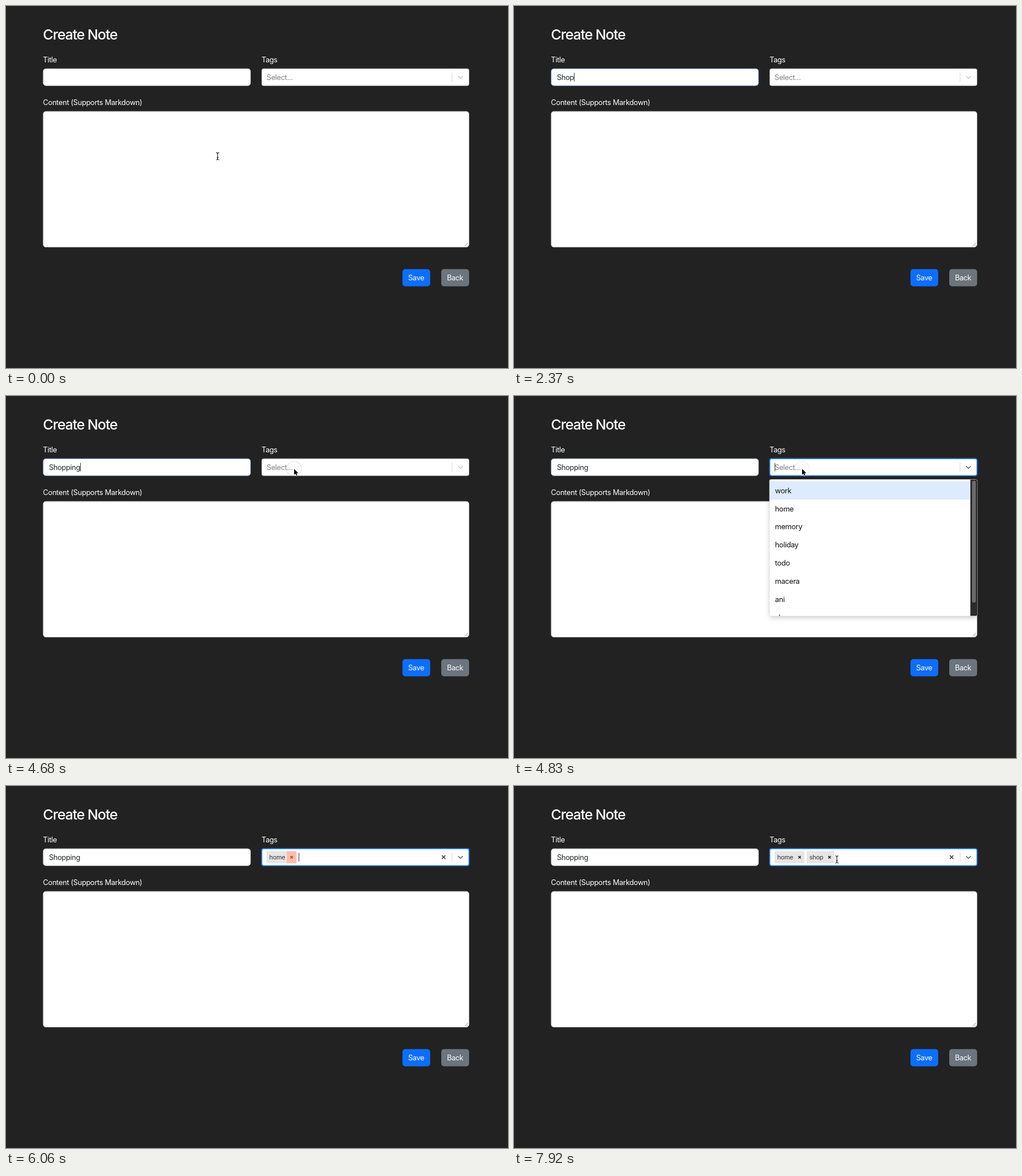
Write an HTML page with a canvas that moves like this. It is 880 by 636 pixels and loops after 8 s.

```html
<!DOCTYPE html>
<html lang="en">
<head>
<meta charset="utf-8">
<title>Create Note</title>
<style>
  html, body { margin: 0; width: 100%; height: 100%; overflow: hidden; background: #222; }
  canvas { display: block; }
</style>
</head>
<body>
<canvas id="stage" width="880" height="636"></canvas>
<script>
const ctx = document.getElementById('stage').getContext('2d');
const LOOP = 8000, BLINK = 450;
const FOCUS_TITLE = 390, FOCUS_TAGS = 4710, ARROW_DOWN = 5820, PICK_HOME = 6000, PICK_SHOP = 7470, MOUSE_BACK = 7860;

const titleKeys = [[0, ''], [1500, 'S'], [1710, 'Sh'], [1920, 'Sho'], [2370, 'Shop'], [2520, 'Shopp'], [2700, 'Shoppn'],
  [3300, 'Shopp'], [3540, 'Shoppi'], [3660, 'Shoppin'], [3780, 'Shopping']];
const tagKeys = [[0, ''], [6600, 's'], [6840, 'sh'], [7050, 'sho'], [7230, 'shop'], [PICK_SHOP, '']];
const caretResets = [FOCUS_TITLE, ...titleKeys.slice(1).map(k => k[0]), 4680, PICK_HOME, ...tagKeys.slice(1).map(k => k[0])];
const mousePath = [[0, 371, 264], [360, 258, 131], [4140, 258, 131], [4640, 505, 128], [7830, 505, 128], [7920, 566, 129]];
const options = ['work', 'home', 'memory', 'holiday', 'todo', 'macera', 'ani', 'shop'];

const lastKey = (keys, t) => keys.filter(k => k[0] <= t).pop()[1];
const mix = (a, b, p) => a + (b - a) * p;
const clamp = p => Math.max(0, Math.min(1, p));

function box(x, y, w, h, r, fill, stroke, lineWidth = 0.8) {
  ctx.beginPath();
  ctx.roundRect(x, y, w, h, r);
  ctx.fillStyle = fill;
  ctx.fill();
  if (stroke) {
    ctx.strokeStyle = stroke;
    ctx.lineWidth = lineWidth;
    ctx.stroke();
  }
}

function line(points, color, width, close) {
  ctx.beginPath();
  points.forEach(([x, y]) => ctx.lineTo(x, y));
  if (close) ctx.closePath();
  ctx.strokeStyle = color;
  ctx.lineWidth = width;
  ctx.stroke();
}

function text(str, x, y, color, size = 12.8, weight = 400, tracking = -0.027) {
  ctx.font = `${weight} ${size}px Inter, sans-serif`;
  ctx.letterSpacing = size * tracking + 'px';
  ctx.fillStyle = color;
  ctx.fillText(str, x, y);
  return x + ctx.measureText(str).width;
}

function cross(x, y, r, color, width) {
  line([[x - r, y - r], [x + r, y + r]], color, width);
  line([[x - r, y + r], [x + r, y - r]], color, width);
}

function caret(x, t) {
  const since = t - caretResets.filter(r => r <= t).pop();
  if (Math.floor(since / BLINK) % 2) return;
  ctx.fillStyle = '#333';
  ctx.fillRect(x, 117.5, 1, 15);
}

function tag(label, x, w, hot) {
  box(x, 114.4, w, 21.4, 1.6, '#e6e6e6');
  if (hot) box(x + w - 17, 114.4, 17, 21.4, [0, 1.6, 1.6, 0], '#ffbdad');
  text(label, x + 4.8, 129, '#333', 10.9);
  cross(x + w - 8.5, 125.1, 2.1, hot ? '#de350b' : '#111', 1.5);
}

function drawForm(t) {
  ctx.fillStyle = '#222';
  ctx.fillRect(0, 0, 880, 636);
  text('Create Note', 64.8, 59, '#fff', 24.9, 500, -0.045);
  text('Title', 64.8, 99, '#fff');
  text('Tags', 448, 99, '#fff');
  text('Content (Supports Markdown)', 64.8, 174, '#fff');

  const glow = clamp((t - FOCUS_TITLE) / 150) * clamp((FOCUS_TAGS + 150 - t) / 150);
  const border = [[206, 134], [212, 183], [218, 254]].map(([a, b]) => mix(a, b, glow));
  box(65.2, 110.2, 363.4, 29.8, 4.8, '#fff', `rgb(${border})`);
  const end = text(lastKey(titleKeys, t), 75.2, 130, '#212529');
  if (t >= FOCUS_TITLE && t < FOCUS_TAGS) caret(end, t);

  box(65.2, 185.2, 746.4, 238.4, 4.8, '#fff', '#ced4da');
  line([[804, 422], [810, 416]], '#777', 0.8);
  line([[807.5, 422], [810, 419.5]], '#777', 0.8);

  box(695, 462.3, 48.6, 30.2, 4.8, '#0d6efd');
  box(763, 462.3, 48.8, 30.2, 4.8, '#6c757d');
  text('Save', 705, 482, '#fff');
  text('Back', 773, 482, '#fff');
}

function drawSelect(t) {
  const focused = t >= FOCUS_TAGS, hasHome = t >= PICK_HOME, hasShop = t >= PICK_SHOP;
  box(448.4, 110.2, 363.2, 29.8, 3.2, '#fff', focused ? '#2684ff' : '#ccc', focused ? 1.7 : 0.8);
  line([[782, 117], [782, 133]], '#ccc', 0.8);
  ctx.lineCap = ctx.lineJoin = 'round';
  line([[792.9, 123.5], [796.7, 127.2], [800.5, 123.5]], focused ? '#666' : '#ccc', 1.6);
  ctx.lineCap = 'butt';
  ctx.lineJoin = 'miter';

  let x = 456.8;
  if (!hasHome) text('Select...', x, 130, '#808080');
  if (hasHome) {
    tag('home', x, 52.4, t < MOUSE_BACK);
    cross(767.2, 125.1, 3.1, '#555', 1.8);
    x = 513;
  }
  if (hasShop) {
    tag('shop', x, 48.6, false);
    x = 565;
  }
  const end = text(lastKey(tagKeys, t), x, 130, '#333');
  if (focused) caret(end, t);
}

function drawMenu(items, active, scrolls) {
  const top = 146.8, h = scrolls ? 239.6 : items.length * 31.9 + 6.4;
  ctx.save();
  ctx.shadowColor = 'rgba(0,0,0,.2)';
  ctx.shadowBlur = 9;
  ctx.shadowOffsetY = 3.2;
  box(448, top, 364, h, 3.2, '#fff');
  ctx.restore();
  box(447.6, top - 0.4, 364.8, h + 0.8, 3.2, '#fff', 'rgba(0,0,0,.1)');

  ctx.save();
  ctx.beginPath();
  ctx.roundRect(448, top, 364, h, 3.2);
  ctx.clip();
  const w = scrolls ? 352 : 364;
  items.forEach((item, i) => {
    const y = top + 3.2 + i * 31.9;
    if (i === active) box(448, y, w, 31.9, 0, '#deebff');
    text(item, 457.6, Math.round(y + 20.6), '#111');
  });
  if (scrolls) {
    box(800, top, 12, h, 0, '#2b2b2b');
    box(803, 149, 6.6, 214, 3.3, '#6b6b6b');
  }
  ctx.restore();
}

function drawOpenMenu(t) {
  if (t >= FOCUS_TAGS && t < PICK_HOME) drawMenu(options, t < ARROW_DOWN ? 0 : 1, true);
  const typed = lastKey(tagKeys, t);
  if (typed) drawMenu(typed === 'shop' ? ['shop'] : ['shop', `Create "${typed}"`], 0, false);
}

function drawRing(t, start, x, y) {
  const p = (t - start) / 380;
  if (p < 0 || p > 1) return;
  ctx.beginPath();
  ctx.arc(x, y, 13, 0, 7);
  ctx.strokeStyle = `rgba(140,140,140,${0.25 * (1 - p)})`;
  ctx.lineWidth = 1.2;
  ctx.stroke();
}

function drawMouse(t) {
  if ((t >= 1500 && t < 4140) || (t >= ARROW_DOWN && t < MOUSE_BACK)) return;
  const i = mousePath.findLastIndex(k => k[0] <= t);
  const from = mousePath[i], to = mousePath[i + 1] || from;
  const p = clamp((t - from[0]) / (to[0] - from[0] || 1)), ease = p * p * (3 - 2 * p);
  const x = mix(from[1], to[1], ease), y = mix(from[2], to[2], ease);
  const overField = x < 429 && y > 110 && y < 140 || y > 185 || x > 561;

  ctx.save();
  ctx.translate(x, y);
  if (overField) {
    const bar = [[0, -5], [0, 5]];
    const ends = [-1, 1].map(s => [[-2.8, 6.3 * s], [-1.2, 6.1 * s], [0, 5 * s], [1.2, 6.1 * s], [2.8, 6.3 * s]]);
    [bar, ...ends, [[-1.6, 2.3], [1.6, 2.3]]].forEach(points => line(points, '#111', 1.1));
  } else {
    line([[0, 0], [0, 10.5], [2.4, 8.3], [4, 12], [5.7, 11.3], [4.1, 7.7], [7.3, 7.5]], '#fff', 1.6, true);
    ctx.fillStyle = '#000';
    ctx.fill();
  }
  ctx.restore();
}

function frame(now) {
  const t = now % LOOP;
  drawForm(t);
  drawSelect(t);
  drawOpenMenu(t);
  drawRing(t, FOCUS_TITLE, 258, 131);
  drawRing(t, 4670, 505, 128);
  drawMouse(t);
  requestAnimationFrame(frame);
}

const startTime = performance.now();
const tick = () => frame(Math.max(0, performance.now() - startTime));
requestAnimationFrame(function loop() {
  tick();
});
</script>
</body>
</html>
```
